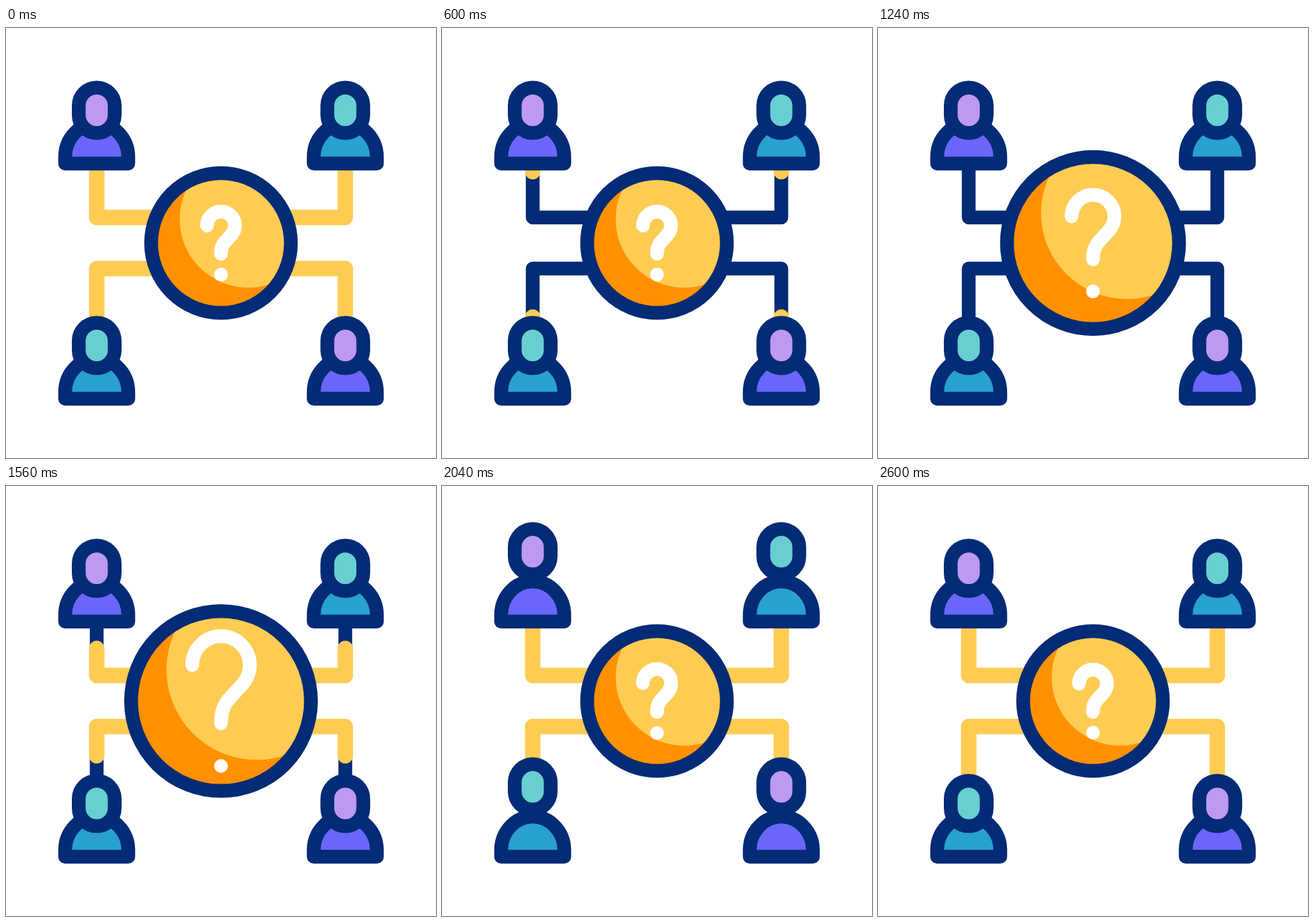
Write an HTML page with a canvas that moves like this. It is 640 px wide and 640 px high and loops after 2.64 s.

```html
<!DOCTYPE html>
<html lang="en">
<head>
<meta charset="utf-8">
<title>Question network</title>
<style>
  html, body { margin: 0; width: 100%; height: 100%; overflow: hidden; background: #fff; }
  canvas { display: block; width: 100vw; height: 100vh; object-fit: contain; }
</style>
</head>
<body>
<canvas id="stage" width="640" height="640"></canvas>
<script>
const ctx = document.getElementById('stage').getContext('2d');
const LOOP = 2640, STEP = 40, STROKE = 20.5;
const NAVY = '#042b75', YELLOW = '#fecc53', ORANGE = '#ff9100';
const PURPLE = ['#bd99f1', '#6b66fb'], BLUE = ['#68ced1', '#28a1ce'];

// x, top y, [face, body] colours
const people = [
  [135, 0, PURPLE], [505, 0, BLUE],
  [135, 350, BLUE], [505, 350, PURPLE]
];

const body = new Path2D('M-47 201.75V192A47 50 0 0 1 47 192V201.75Z');
const head = new Path2D();
head.roundRect(-26.75, 88.75, 53.5, 67.5, 26.75);

// Smooth progress from 0 to 1 between two times
function ease(t, from, to) {
  const p = Math.min(1, Math.max(0, (t - from) / (to - from)));
  return p * p * (3 - 2 * p);
}

// Rise to 1 and fall back to 0
const pulse = (t, start, peak, end) => ease(t, start, peak) - ease(t, peak, end);

function outline(path, fill) {
  ctx.fillStyle = fill;
  ctx.fill(path);
  ctx.strokeStyle = NAVY;
  ctx.lineWidth = STROKE;
  ctx.stroke(path);
}

function disc(x, y, r, fill) {
  ctx.beginPath();
  ctx.arc(x, y, r, 0, 2 * Math.PI);
  ctx.fillStyle = fill;
  ctx.fill();
}

function drawLink(x, top, from, to) {
  const lineY = top ? 358 : 282, endY = top ? 442.4 : 202;
  const startX = x < 320 ? 225 : 415;
  const length = 90 + Math.abs(endY - lineY);
  const path = new Path2D(`M${startX} ${lineY}H${x}V${endY}`);
  ctx.strokeStyle = NAVY;
  ctx.lineWidth = STROKE;
  ctx.stroke(path);
  if (to <= from) return;
  ctx.strokeStyle = YELLOW;
  ctx.lineWidth = 23;
  ctx.setLineDash([length * (to - from), 999]);
  ctx.lineDashOffset = -length * from;
  ctx.stroke(path);
  ctx.setLineDash([]);
}

function drawPerson(x, top, [face, shirt], lift) {
  ctx.save();
  ctx.translate(x, top);
  outline(body, shirt);
  ctx.translate(0, -lift);
  outline(head, face);
  ctx.restore();
}

function drawBall(r) {
  const k = (r - STROKE / 2) / 93.75;
  const ring = new Path2D();
  ring.arc(0, 0, r, 0, 2 * Math.PI);
  ctx.save();
  ctx.clip(ring);
  disc(0, 0, r, ORANGE);
  disc(40.5 * k, -35.5 * k, 102 * k, YELLOW);
  ctx.restore();
  outline(ring, 'transparent');
}

// The mark spreads out while its line weight stays the same
function drawMark(k) {
  ctx.save();
  ctx.scale(k, k);
  ctx.beginPath();
  ctx.arc(0, -26, 20.8, Math.PI, Math.PI * 2.233);
  ctx.lineTo(5.4, -1);
  ctx.bezierCurveTo(1.5, 3.4, 0, 9, 0, 16);
  ctx.restore();
  ctx.strokeStyle = '#fff';
  ctx.lineWidth = STROKE;
  ctx.stroke();
  disc(0, 47 * k, STROKE / 2, '#fff');
}

function draw(t) {
  ctx.fillStyle = '#fff';
  ctx.fillRect(0, 0, 640, 640);
  ctx.lineCap = ctx.lineJoin = 'round';

  const refill = t >= 1135;
  const from = refill ? 0 : ease(t, 80, 700);
  const to = refill ? ease(t, 1135, 1755) : 1;
  const lift = 25 * pulse(t, 1645, 2070, 2560);

  for (const [x, top] of people) drawLink(x, top, from, to);
  for (const [x, top, colours] of people) drawPerson(x, top, colours, lift);

  ctx.save();
  ctx.translate(320, 320);
  drawBall(104 + 34 * pulse(t, 880, 1440, 1990));
  drawMark(1 + 1.064 * pulse(t, 940, 1540, 2080));
  ctx.restore();
}

const begin = performance.now();
function tick() {
  const t = (performance.now() - begin) % LOOP;
  draw(Math.floor(t / STEP) * STEP);
  requestAnimationFrame(tick);
}
tick();
</script>
</body>
</html>
```
